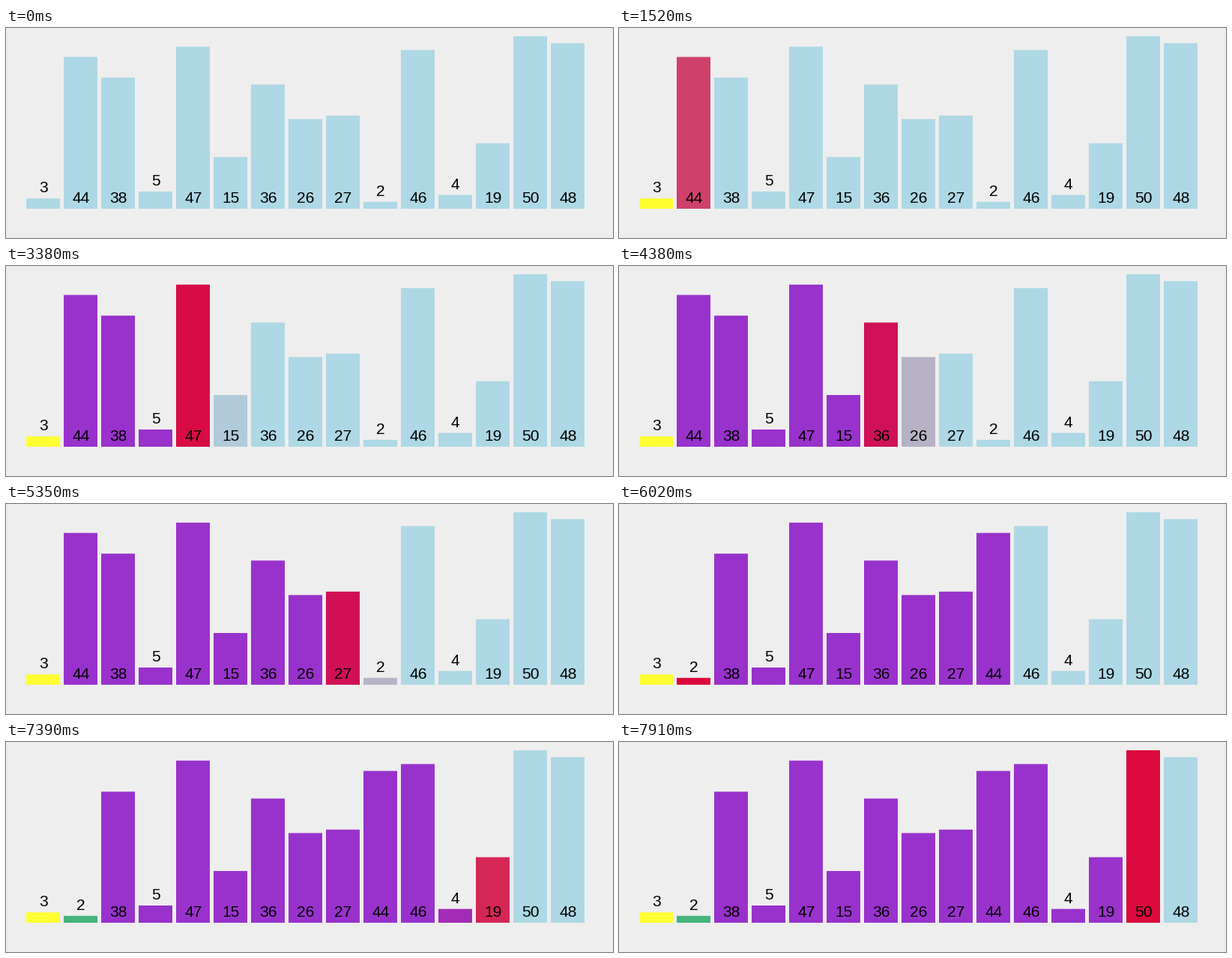
Write a matplotlib script that moves like this. It is 810 px wide and 280 px high and loops after 8000 ms.

```python
import matplotlib.pyplot as plt
from matplotlib.animation import FuncAnimation
from matplotlib.colors import to_rgb
from matplotlib.patches import Rectangle
import numpy as np

W, H, DPI = 810, 280, 100
LOOP, STEP = 8000, 20
VALUES = [3, 44, 38, 5, 47, 15, 36, 26, 27, 2, 46, 4, 19, 50, 48]
BASE, SCALE, PITCH, BAR_W, LEFT = 241, 4.6, 50, 45, 27

BLUE, YELLOW, RED = "#aed8e5", "#ffff33", "#dc083c"
PURPLE, GREEN = "#9932cc", "#45b37a"

# One algorithm step every PERIOD ms, each eased over EASE ms.
FIRST, PERIOD, EASE = 886, 486.3, 250

# The picture refreshes in ticks of about 135 ms, with a slight drift.
TICKS = np.interp(range(52), [0, 4, 12, 18, 25, 32, 41, 51],
                  [1030, 1520, 2580, 3380, 4380, 5350, 6570, 7910])


def build_states():
    """Partition steps as (colours, slots), indexed by bar."""
    colours = [BLUE] * len(VALUES)
    slots = list(range(len(VALUES)))
    states = [(colours[:], slots[:])]

    def push():
        states.append((colours[:], slots[:]))

    colours[0] = YELLOW
    push()
    store = 0
    for k in range(1, len(VALUES)):
        colours[k] = RED
        push()
        small = VALUES[k] < VALUES[0]
        if small:
            store += 1
            slots[store], slots[k] = slots[k], slots[store]
            push()
        colours[k] = GREEN if small else PURPLE
    return states


STATES = build_states()


def ease(u):
    u = min(max(u, 0), 1)
    return 4 * u ** 3 if u < 0.5 else 1 - 4 * (1 - u) ** 3


def mix(a, b, p):
    return tuple(np.array(to_rgb(a)) * (1 - p) + np.array(to_rgb(b)) * p)


fig = plt.figure(figsize=(W / DPI, H / DPI), dpi=DPI, facecolor="#eeeeee")
ax = fig.add_axes([0, 0, 1, 1])
ax.set_xlim(0, W)
ax.set_ylim(H, 0)
ax.axis("off")

bars, labels = [], []
for i, v in enumerate(VALUES):
    top = BASE - v * SCALE
    bar = Rectangle((0, top), BAR_W, v * SCALE, lw=0, snap=False, zorder=2 * i)
    bars.append(ax.add_patch(bar))
    baseline = 233 if v > 10 else top - 8
    labels.append(ax.text(0, baseline, str(v), ha="center", va="baseline",
                          family="Liberation Sans", size=21 * 72 / DPI,
                          color="black", zorder=2 * i + 1))


def draw(frame):
    now = frame * STEP + STEP / 2
    t = max(TICKS[TICKS <= now], default=0)
    k = max(int((t - FIRST) // PERIOD), 0)
    p = ease((t - FIRST - k * PERIOD) / EASE)
    (c0, s0), (c1, s1) = STATES[k], STATES[k + 1]
    for i, (bar, label) in enumerate(zip(bars, labels)):
        x = LEFT + PITCH * (s0[i] + (s1[i] - s0[i]) * p)
        bar.set_x(x)
        bar.set_facecolor(mix(c0[i], c1[i], p))
        label.set_x(x + BAR_W / 2 + 0.3)
    return bars + labels


anim = FuncAnimation(fig, draw, frames=LOOP // STEP, interval=STEP,
                     repeat=True, repeat_delay=0)
plt.show()
```
